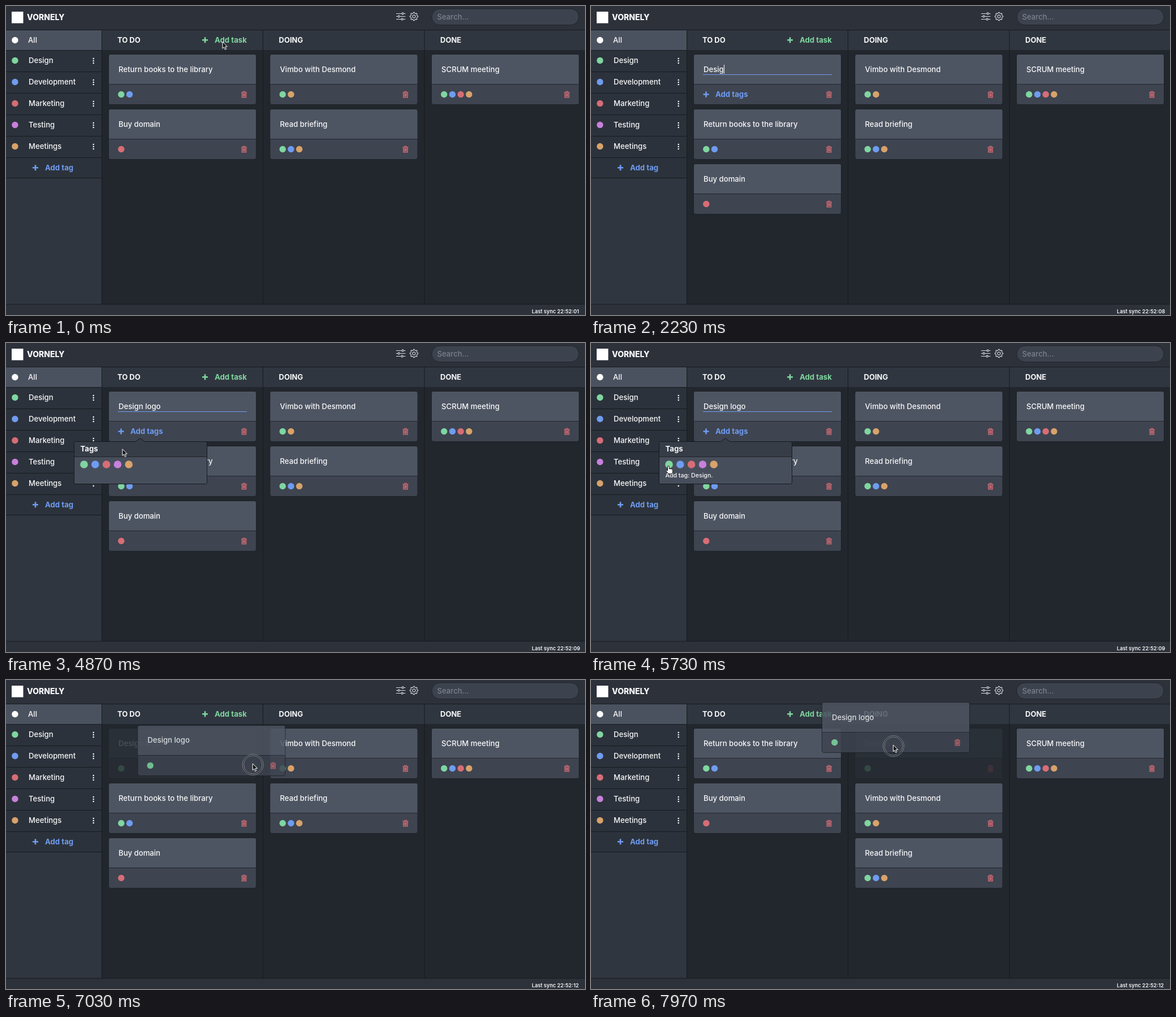
An HTML page for the animation above (8 s loop, 1024 by 547 pixels).

```html
<!DOCTYPE html>
<html lang="en">
<head>
<meta charset="utf-8">
<title>Task board</title>
<style>
  html, body { margin: 0; width: 100%; height: 100%; overflow: hidden; background: #22272e; }
  svg { display: block; width: 100vw; height: 100vh; }
  text { font-family: Inter, "Open Sans", sans-serif; font-size: 13.15px; font-weight: 500; fill: #f7f8fa; white-space: pre; }
  .head { font-size: 13px; font-weight: 700; }
  .brand { font-size: 14px; font-weight: 800; }
  .action { font-size: 13.2px; font-weight: 700; }
  .small { font-size: 10.6px; }
  .sync { font-size: 9.2px; font-weight: 600; }
</style>
</head>
<body>
<script>
const LOOP = 8000;
const C = {
  bg: '#22272e', bar: '#2c313a', line: '#171a1f', top: '#4e5562', foot: '#3e4450',
  green: '#7fd6a0', blue: '#6f9cf0', red: '#d76d76', purple: '#c780db', orange: '#d8a26a', white: '#fff'
};
const TAGS = [['Design', C.green], ['Development', C.blue], ['Marketing', C.red], ['Testing', C.purple], ['Meetings', C.orange]];
const COLS = [182.5, 468, 753.5], TOP = 86.5, PITCH = 97;

// ---- drawing helpers ----
function el(name, parent, attrs = {}) {
  const node = document.createElementNS('http://www.w3.org/2000/svg', name);
  for (const key in attrs) node.setAttribute(key, attrs[key]);
  parent.append(node);
  return node;
}
const group = parent => el('g', parent);
const rect = (p, x, y, width, height, fill, more) => el('rect', p, { x, y, width, height, fill, ...more });
const dot = (p, cx, cy, r, fill) => el('circle', p, { cx, cy, r, fill });
const path = (p, d, more) => el('path', p, { d, fill: 'none', ...more });
const hline = (p, y, x1, x2, stroke = C.line) => path(p, `M${x1} ${y}H${x2}`, { stroke });
const vline = (p, x, y1, y2) => path(p, `M${x} ${y1}V${y2}`, { stroke: C.line });
function label(p, x, y, str, cls = '', fill) {
  const node = el('text', p, { x, y, class: cls });
  node.textContent = str;
  if (fill) node.style.fill = fill;
  return node;
}
function action(p, cx, cy, x, str, color) {
  path(p, `M${cx - 5} ${cy}h10M${cx} ${cy - 5}v10`, { stroke: color, 'stroke-width': 2.6 });
  label(p, x, cy + 4.8, str, 'action', color);
}
function trash(p, x, y) {
  rect(p, x - 3.8, y - 3, 7.6, 8.4, C.red, { 'fill-opacity': 0.3 });
  path(p, `M${x - 5} ${y - 3.4}h10M${x - 1.8} ${y - 3.8}v-1.4h3.6v1.4M${x - 3.8} ${y - 3}v8.4h7.6v-8.4M${x - 1.6} ${y - 1.5}v5M${x} ${y - 1.5}v5M${x + 1.6} ${y - 1.5}v5`,
    { stroke: C.red, 'stroke-width': 1.1 });
}
const move = (node, x, y) => node.setAttribute('transform', `translate(${x} ${y})`);
const show = (node, on) => { node.style.display = on ? '' : 'none'; };

const svg = el('svg', document.body, { viewBox: '0 0 1024 547', preserveAspectRatio: 'none' });

// ---- frame of the app ----
rect(svg, 0, 0, 1024, 547, C.bg);
rect(svg, 0, 0, 1024, 43, C.bar);
rect(svg, 170, 43, 854, 35, '#30363f');
rect(svg, 0, 78, 169, 450, '#2c323b');
rect(svg, 0, 305, 169, 223, '#30363f');
rect(svg, 0, 43, 169, 35, '#4b525f');
rect(svg, 0, 528, 1024, 19, C.bar);
for (const y of [42.5, 528]) hline(svg, y, 0, 1024);
for (const x of [169.5, 454.5, 740]) vline(svg, x, 43, 528);
for (const y of [78.5, 116.5, 154.5, 192.5, 230.5, 268.5, 304.5]) hline(svg, y, 0, 169);

rect(svg, 10, 10, 20.5, 20.5, C.white);
label(svg, 37, 25.3, 'VORNELY', 'brand');
rect(svg, 753, 5, 260, 28.5, '#3d434e', { rx: 14.2, stroke: '#22272e' });
label(svg, 762.5, 23.6, 'Search...', '', '#7b828e');

// sliders and gear icons
const icon = { stroke: '#d9dce1', 'stroke-width': 1.1 };
path(svg, 'M690 13.5h10M703.5 13.5h3M690 18.5h3M696.5 18.5h10M690 23.5h9M702.5 23.5h4', icon);
for (const [x, y] of [[701.7, 13.5], [694.7, 18.5], [700.7, 23.5]]) el('circle', svg, { cx: x, cy: y, r: 1.6, fill: 'none', ...icon });
let gear = '';
for (let i = 0; i < 32; i++) {
  const a = (i - 0.5) * Math.PI / 16, r = i % 4 < 2 ? 7.2 : 5.6;
  gear += `${i ? 'L' : 'M'}${721.5 + r * Math.cos(a)} ${18.5 + r * Math.sin(a)}`;
}
path(svg, gear + 'z', icon);
el('circle', svg, { cx: 721.5, cy: 18.5, r: 2.5, fill: 'none', ...icon });

// sidebar
dot(svg, 15.9, 60.5, 5.7, C.white);
label(svg, 39, 65, 'All');
TAGS.forEach(([name, color], i) => {
  const y = 96.5 + 38 * i;
  dot(svg, 15.9, y, 5.7, color);
  label(svg, 40, y + 4.5, name);
  for (const d of [-3.5, 0.5, 4.5]) dot(svg, 154.7, y + d, 1.25, C.white);
});
action(svg, 52, 286.3, 69, 'Add tag', C.blue);

// column heads
['TO DO', 'DOING', 'DONE'].forEach((name, i) => label(svg, [197, 482.5, 768][i], 65, name, 'head'));
action(svg, 352, 60.3, 369, 'Add task', C.green);
const sync = label(svg, 930, 543.6, '', 'sync');

// ---- cards ----
function card(parent, title, tags) {
  const g = group(parent);
  rect(g, -1, -1, 261, 89, C.foot, { rx: 3.5, stroke: '#1e2228' });
  path(g, 'M-.5 52V2.5q0-3 3-3h254q3 0 3 3v49.5z', { fill: C.top });
  hline(g, 52, -0.5, 259.5, '#23282f');
  if (title) label(g, 16.5, 30, title);
  tags.forEach((color, i) => dot(g, 21.3 + 14.7 * i, 70, 5.7, color));
  trash(g, 238.5, 70);
  return g;
}
const todo = [['Return books to the library', [C.green, C.blue]], ['Buy domain', [C.red]]].map(c => card(svg, ...c));
const doing = [['Vimbo with Desmond', [C.green, C.orange]], ['Read briefing', [C.green, C.blue, C.orange]]].map(c => card(svg, ...c));
move(card(svg, 'SCRUM meeting', [C.green, C.blue, C.red, C.orange]), COLS[2], TOP);

const TITLE = 'Design logo';
const draft = card(svg, '', []);
move(draft, COLS[0], TOP);
const underline = hline(draft, 35, 15.5, 243.5, C.blue);
const hint = label(draft, 16.5, 30, 'New Task', '', '#a4a9b3');
const typed = label(draft, 16.5, 30, '');
const caret = rect(draft, 16.2, 17.5, 1, 16, C.white);
const addTags = group(draft);
action(addTags, 21, 70, 37.5, 'Add tags', C.blue);
const draftDot = dot(draft, 21.3, 70, 5.7, C.green);

const ghost = card(svg, TITLE, [C.green]);
ghost.style.opacity = 0.2;
const dragged = card(svg, TITLE, [C.green]);
dragged.style.opacity = 0.85;

// ---- tooltip and tag popover ----
const tip = group(svg);
path(tip, 'M370.5 76.5l5-5.5 5 5.5z', { fill: '#6c97df' });
rect(tip, 345, 76, 61.5, 21.5, '#6c97df', { rx: 3 });
label(tip, 351, 90.6, '(Ctrl + N)', 'small').style.fontWeight = 600;

const pop = group(svg);
rect(pop, 120.5, 174.5, 235, 75, '#474e5b', { rx: 3 });
path(pop, 'M120.5 201.5v-24q0-3 3-3h106l8-6 8 6h107q3 0 3 3v24z', { fill: '#373d47' });
hline(pop, 201.5, 120, 356, '#1f2329');
path(pop, 'M123.5 174.5h106l8-6 8 6h107q3 0 3 3v69q0 3-3 3h-229q-3 0-3-3v-69q0-3 3-3z', { stroke: '#16191d' });
label(pop, 131.5, 192.3, 'Tags').style.fontWeight = 700;
const tagX = i => 138 + 19.8 * i, TAG_Y = 215;
TAGS.forEach(([, color], i) => dot(pop, tagX(i), TAG_Y, 6.8, color));
const popText = label(pop, 131.5, 237.8, '', 'small');

// ---- pointer ----
const pointer = group(svg);
const ring = group(pointer);
ring.style.opacity = 0.7;
el('circle', ring, { cx: 0.5, cy: 2, r: 17.2, fill: 'none', stroke: '#14171b', 'stroke-opacity': 0.6, 'stroke-width': 3 });
for (const r of [18.4, 16.2]) el('circle', ring, { cx: 0.5, cy: 2, r, fill: 'none', stroke: '#d4d7dc', 'stroke-width': 0.7 });
const arrow = path(pointer, 'M0 0v11.6l2.6-2.4 1.9 4.4 2-.9-1.9-4.3h3.7z', { fill: '#111', stroke: '#fff', 'stroke-width': 1 });
const hand = path(pointer, 'M-1.5 8V1a1.4 1.4 0 0 1 2.8 0v4q1-1 2.2 0 1.2-.8 2.2.3 1.6-.5 1.8 1.3v3q0 1.5-1.2 4H-.3q-1.2-2.5-4-5 .2-2 2.8-.6z',
  { fill: '#fff', stroke: '#111', 'stroke-width': 1 });

// ---- timeline ----
const AT = { tip: 170, add: 620, tipOff: 1260, type: 1450, back: 3600, open: 4280, tag: 6230, close: 6380, drag: 6800, drop: 7300 };
const KEYS = [1450, 1600, 1900, 2050, 2200, 2370, 2530, 2680, 2850, 3010, 3230];
const SYNC = [[0, '01'], [AT.add, '06'], [1450, '07'], [2200, '08'], [3230, '09'], [AT.tag, '12']];
// time, x, y; "linear" marks a steady segment ending there
const POINTER = [
  [0, 383, 63.5], [250, 380, 66], [600, 379, 68], [1150, 379, 68], [1420, 345, 112],
  [3600, 330, 125], [3980, 271, 157], [4450, 271, 157], [5100, 180, 200], [5550, 137, 218], [6300, 137, 218],
  [6720, 385, 153], [6800, 385, 153], [7030, 436, 148, 'linear'], [7250, 482, 132, 'linear'], [7480, 522, 119, 'linear'], [7970, 534.5, 115]
];
const DRAG = [[6800, 182.5, 86.5], [7030, 233.5, 81.5, 'linear'], [7250, 315, 58, 'linear'], [7480, 397, 41, 'linear'], [7970, 409.5, 40.5]];
const HANDS = [[80, 1260], [3900, 4560]];
const PRESSES = [[560, 690], [4220, 4350], [6170, 6300], [6740, LOOP]];

const within = (spans, t) => spans.some(([a, b]) => t >= a && t < b);
const fade = (t, on, off, d = 120) => Math.max(0, Math.min(1, (t - on) / d, (off - t) / d));
function track(keys, t) {
  const i = keys.findIndex(k => k[0] > t);
  if (i < 1) return keys[i ? keys.length - 1 : 0].slice(1, 3);
  const a = keys[i - 1], b = keys[i];
  let u = (t - a[0]) / (b[0] - a[0]);
  if (!b[3]) u = u * u * (3 - 2 * u);
  return [a[1] + (b[1] - a[1]) * u, a[2] + (b[2] - a[2]) * u];
}

function render(t) {
  const added = t >= AT.add, dragging = t >= AT.drag, moved = t >= AT.drop;
  const tagged = t >= AT.tag;

  todo.forEach((c, i) => move(c, COLS[0], TOP + PITCH * (i + (added && !moved))));
  doing.forEach((c, i) => move(c, COLS[1], TOP + PITCH * (i + moved)));
  sync.textContent = 'Last sync 22:52:' + SYNC.filter(s => s[0] <= t).pop()[1];

  // new task being typed
  const count = KEYS.filter(k => k <= t).length;
  show(draft, added && !dragging);
  typed.textContent = TITLE.slice(0, count);
  show(hint, !count);
  show(addTags, !tagged);
  show(draftDot, tagged);
  show(underline, !tagged);
  const since = t - (count ? KEYS[count - 1] : AT.add);
  show(caret, added && t < AT.open && since % 1060 < 530);
  if (added) caret.setAttribute('x', 16.2 + (count ? typed.getComputedTextLength() + 0.5 : 0));

  // dragging
  show(ghost, dragging);
  show(dragged, dragging);
  move(ghost, COLS[+moved], TOP);
  move(dragged, ...track(DRAG, t));

  // pointer and overlays
  const [x, y] = track(POINTER, t);
  const open = t >= AT.open && t < AT.close;
  const over = open ? TAGS.findIndex((_, i) => Math.hypot(x - tagX(i), y - TAG_Y) < 7.5) : -1;
  tip.style.opacity = fade(t, AT.tip, AT.tipOff);
  pop.style.opacity = fade(t, AT.open, AT.close, 80);
  popText.textContent = over < 0 ? '' : `Add tag: ${TAGS[over][0]}.`;
  const isHand = over >= 0 || within(HANDS, t);
  show(hand, isHand);
  show(arrow, !isHand);
  show(ring, within(PRESSES, t));
  show(pointer, t < AT.type || t >= AT.back);
  move(pointer, x, y);
}

function tick() {
  render(performance.now() % LOOP);
  requestAnimationFrame(tick);
}
tick();
</script>
</body>
</html>
```
